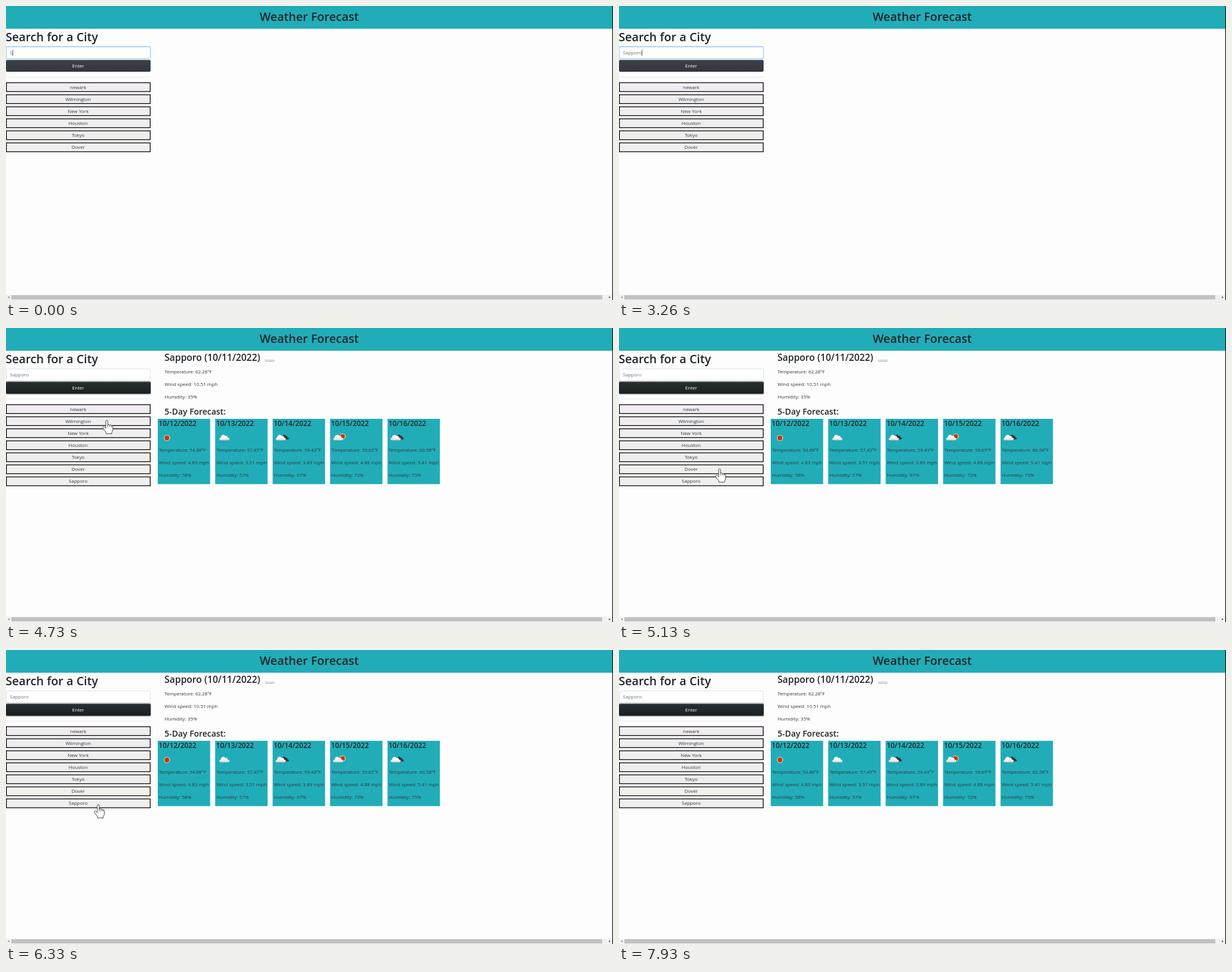
An HTML page that plays this animation: 1016x492 px, repeating every 8 s.

```html
<!DOCTYPE html>
<html lang="en">
<head>
<meta charset="utf-8">
<title>Weather Forecast</title>
<style>
  html, body { margin: 0; width: 100%; height: 100%; overflow: hidden; background: #fdfdfd; }
  svg { display: block; width: 1016px; height: 492px; }
  text { font: 8px "Open Sans", "Noto Sans", sans-serif; fill: #32383d; word-spacing: .2px; white-space: pre; }
  .mid { text-anchor: middle; }
  .head { font-weight: 600; fill: #212529; }
  .h1 { font-size: 19.6px; }
  .h2 { font-size: 15.6px; }
  .h3 { font-size: 13.9px; }
  .h4 { font-size: 11.8px; }
  .tight { letter-spacing: -.09px; }
  .typed { fill: #6c7278; }
  .light { fill: #fff; }
</style>
</head>
<body>
<svg id="stage" viewBox="0 0 1016 492">
  <defs>
    <linearGradient id="fluff" x2="0" y2="1">
      <stop offset=".45" stop-color="#fff"/><stop offset="1" stop-color="#d2d2d2"/>
    </linearGradient>
    <linearGradient id="idle" x2="0" y2="1">
      <stop stop-color="#3b4147"/><stop offset="1" stop-color="#30363c"/>
    </linearGradient>
    <linearGradient id="pressed" x2="0" y2="1">
      <stop stop-color="#272d30"/><stop offset="1" stop-color="#1b2023"/>
    </linearGradient>
    <path id="puff" d="M3 10.5C-.5 10.5-.5 5.8 3 5.8C2.6 1.5 8.5-.8 10.3 3.3C13 2.3 14.5 4 14.3 6C18.6 6.2 18 10.5 15 10.5Z"/>
    <g id="cloud">
      <use href="#puff" fill="url(#fluff)"/>
      <path d="M1.2 9.6Q2 10.6 3 10.6H15Q16.4 10.4 16.9 9" fill="none" stroke="#8d8d8d" stroke-width=".6"/>
    </g>
    <g id="sun">
      <circle r="4.5" fill="none" stroke="#ffd65c" stroke-width="1.7" stroke-dasharray="1.7 1.13"/>
      <circle r="3.7" fill="#e2231a"/>
    </g>
    <g id="broken">
      <use href="#puff" fill="#35383a" transform="translate(9 0) scale(.77 .85)"/>
      <use href="#cloud"/>
    </g>
    <g id="few">
      <use href="#sun" x="16" y="4"/>
      <use href="#cloud"/>
    </g>
  </defs>

  <rect width="1016" height="492" fill="#fdfdfd"/>
  <rect width="1016" height="38" fill="#21adb8"/>
  <text class="head h1 mid" x="507.5" y="25">Weather Forecast</text>
  <text class="head h1" x="-.5" y="59">Search for a City</text>

  <rect id="ring" x="-.6" y="67" width="243.2" height="22" rx="3" fill="#bfdeff"/>
  <rect id="field" x=".5" y="68.5" width="241" height="19.4" rx="2" fill="#fff"/>
  <text id="typed" class="typed" x="6.6" y="81.3"></text>
  <rect id="caret" y="73.3" width=".8" height="10" fill="#333"/>

  <rect id="glow" x="-1" y="88.8" width="244" height="22.6" rx="3" fill="#a9acae"/>
  <rect id="enter" y="90.2" width="242" height="19.8" rx="2"/>
  <text class="light mid" x="120.8" y="103.1">Enter</text>
  <rect y="118.6" width="242" height=".7" fill="#e2e2e2"/>

  <g id="history"></g>
  <g id="report"></g>

  <rect y="483" width="1016" height="9" fill="#f1f1f1"/>
  <rect x="9" y="484" width="989" height="7" fill="#c1c1c1"/>
  <path d="M5.6 485.7V489.3L3.4 487.5Z" fill="#777"/>
  <path d="M1009.4 485.7V489.3L1011.6 487.5Z" fill="#333"/>
  <rect x="1014.8" width="1.2" height="492" fill="#111"/>

  <g id="cursor" stroke-linejoin="round">
    <path id="hand" fill="#fff" stroke="#333" stroke-width=".9"
      d="M-1.2 1.4Q.4-.6 2 1.4V8Q4 6.6 5 8.6Q7 7.4 8 9.5Q10.6 8.8 10.6 11.6V16Q10.4 19 8.8 20.5V23H-1V20.4Q-3.6 17.6-6 13.6C-7 11.6-4.4 10.4-3 12.2L-1.2 14.2ZM2 8V11.5M5 8.6V11.8M8 9.5V12.3"/>
    <path id="arrow" fill="#fff" stroke="#333" stroke-width=".9"
      d="M0 0V16.6L3.8 13L6.6 19.6L9.2 18.5L6.4 12H11.6Z"/>
    <path id="beam" fill="none" stroke="#333" stroke-width="1" d="M-2.5-7Q0-7 0-5.5Q0-7 2.5-7M0-5.5V5.5M-2.5 7Q0 7 0 5.5Q0 7 2.5 7"/>
  </g>
</svg>
<script>
const LOOP = 8000, STEP = LOOP / 120, BLINK = 533;
const CLICK = 4320, LOADED = 4600, FADE = 150, CURSOR_IN = 4050;
const WORD = "Sapporo";
const KEYS = [0, 530, 930, 1260, 1660, 1860, 2200];

// time, x, y of the pointer tip
const TRACK = [
  [4050, 167, 77], [4260, 165.5, 96], [4530, 165.5, 96], [4860, 170, 190],
  [5133, 168, 235], [5460, 158, 257], [5730, 158, 257], [6030, 150, 253],
  [6333, 154, 258], [6600, 157, 258], [7000, 232, 236], [7333, 338, 199],
  [7460, 366, 172], [7700, 415, 92], [7930, 450, -30]
];

const CITIES = ["newark", "Wilmington", "New York", "Houston", "Tokyo", "Dover", WORD];
const TINTS = ["#f0ecf1", "#f0edf1", "#f0eeef", "#eeeeee", "#eeeeed", "#eff1ed", "#efefef"];
const DAYS = [
  ["sun", 54.88, 4.83, 58], ["cloud", 57.45, 3.51, 57], ["broken", 59.43, 3.89, 67],
  ["few", 59.65, 4.88, 72], ["broken", 60.58, 5.41, 75]
];

const $ = id => document.getElementById(id);

function add(parent, tag, attrs, content) {
  const el = document.createElementNS("http://www.w3.org/2000/svg", tag);
  for (const key in attrs) el.setAttribute(key, attrs[key]);
  if (content) el.textContent = content;
  parent.append(el);
  return el;
}

function label(parent, x, y, content, cls = "") {
  return add(parent, "text", { x, y, class: cls }, content);
}

function readings(parent, x, y, temp, wind, humidity) {
  label(parent, x, y, `Temperature: ${temp}°F`, "tight");
  label(parent, x, y + 21.2, `Wind speed: ${wind} mph`);
  label(parent, x, y + 42.4, `Humidity: ${humidity}%`);
}

const boxTop = i => 127.8 + i * 20.13;
const rows = CITIES.map((city, i) => {
  const row = add($("history"), "g", {});
  add(row, "rect", {
    x: .6, y: boxTop(i) + .6, width: 240.8, height: 14.8,
    fill: TINTS[i], stroke: "#080808", "stroke-width": 1.3
  });
  label(row, 120.8, boxTop(i) + 10.9, city, "mid");
  return row;
});

function buildReport() {
  const g = $("report");
  label(g, 265.3, 54.8, `${WORD} (10/11/2022)`, "head h2");
  add(g, "use", { href: "#cloud", x: 432.5, y: 45.3 });
  readings(g, 265.6, 75.8, 62.28, 10.51, 35);
  label(g, 265.3, 144.6, "5-Day Forecast:", "head h3");
  DAYS.forEach(([icon, ...data], i) => {
    const x = 254 + i * 96.15;
    add(g, "rect", { x, y: 152, width: 87.7, height: 109.3, fill: "#21adb8" });
    label(g, x + 1.6, 164.4, `10/${12 + i}/2022`, "head h4");
    const [dx, y] = icon === "sun" ? [15.4, 184] : [icon === "cloud" ? 6.6 : 4.8, 177.6];
    add(g, "use", { href: "#" + icon, x: x + dx, y });
    readings(g, x + 2, 207, ...data);
  });
}

function pointerAt(t) {
  const i = Math.max(1, TRACK.findIndex(p => p[0] >= t));
  const [a, b] = t >= TRACK.at(-1)[0] ? [TRACK.at(-1), TRACK.at(-1)] : [TRACK[i - 1], TRACK[i]];
  const k = a === b ? 0 : (t - a[0]) / (b[0] - a[0]);
  return [a[1] + (b[1] - a[1]) * k, a[2] + (b[2] - a[2]) * k];
}

function pointerShape(x, y, rowCount) {
  if (x > 242) return "arrow";
  if (y > 68 && y < 88) return "beam";
  const onRow = CITIES.some((_, i) => i < rowCount && y >= boxTop(i) && y <= boxTop(i) + 16);
  return onRow || (y >= 90 && y <= 110) ? "hand" : "arrow";
}

const show = (el, on) => el.style.display = on ? "" : "none";
const mix = (a, b, k) => `rgb(${a.map((v, i) => Math.round(v + (b[i] - v) * k))})`;

let inputTextWidths;
function measure() {
  $("typed").textContent = WORD;
  inputTextWidths = KEYS.map((_, i) => $("typed").getSubStringLength(0, i + 1));
}

function draw(t) {
  const typed = KEYS.filter(k => k <= t).length;
  const sinceKey = t - KEYS[typed - 1];
  const focused = t < CLICK;
  $("typed").textContent = WORD.slice(0, typed);
  $("caret").setAttribute("x", 6.6 + inputTextWidths[typed - 1]);
  show($("caret"), focused && Math.floor((sinceKey + 8) / BLINK) % 2 === 0);

  const blur = Math.min(1, Math.max(0, (t - CLICK) / FADE));
  $("ring").style.opacity = 1 - blur;
  $("field").setAttribute("stroke", mix([128, 189, 255], [206, 212, 218], blur));
  $("field").setAttribute("stroke-width", .7);

  const [x, y] = pointerAt(t);
  const pointing = t >= CURSOR_IN;
  const hover = pointing && x < 242 && y >= 90 && y <= 110;
  $("enter").setAttribute("fill", focused && !hover ? "url(#idle)" : "url(#pressed)");
  $("glow").style.opacity = blur;

  const loaded = t >= LOADED;
  show($("report"), loaded);
  show(rows.at(-1), loaded);

  show($("cursor"), pointing);
  $("cursor").setAttribute("transform", `translate(${x} ${y})`);
  const shape = pointerShape(x, y, loaded ? 7 : 6);
  for (const id of ["hand", "arrow", "beam"]) show($(id), id === shape);
}

function tick(now) {
  const t = now % LOOP;
  draw(Math.floor((t + 7) / STEP) * STEP % LOOP);
  requestAnimationFrame(tick);
}

buildReport();
measure();
tick(performance.now());
</script>
</body>
</html>
```
